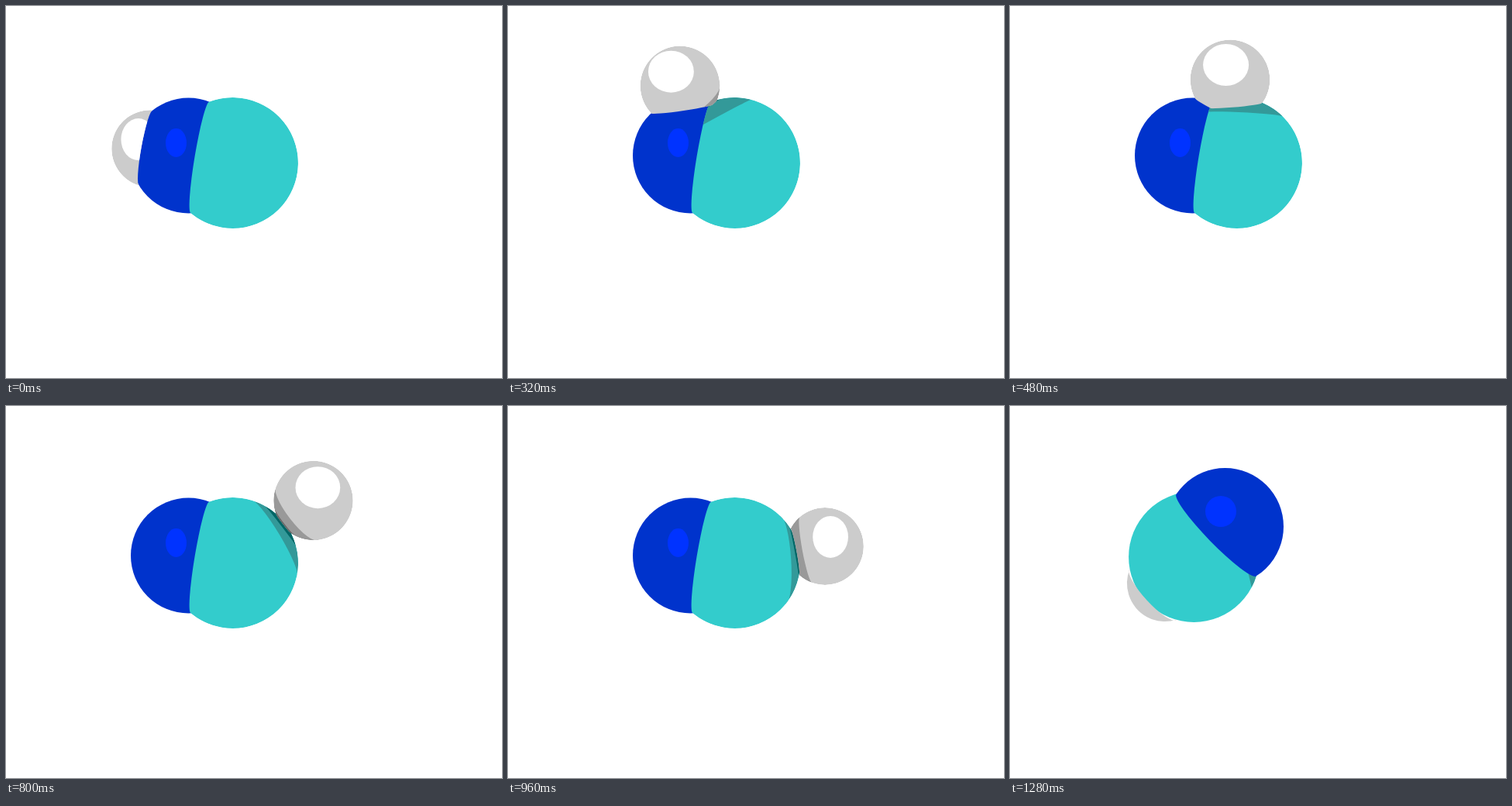
Animation of 640x480 px, one loop 1440 ms. Source, as an HTML page with a canvas:

```html
<!DOCTYPE html>
<html>
<head>
<meta charset="utf-8">
<title>Three-atom rearrangement</title>
<style>
html, body { margin: 0; width: 100%; height: 100%; overflow: hidden; background: #fff; }
canvas { display: block; }
</style>
</head>
<body>
<canvas id="stage" width="640" height="480"></canvas>
<script>
const ctx = document.getElementById('stage').getContext('2d');
const STEP = 160, SHADE_SPREAD = 0.75;
const BLUE = '#0033cc', GLINT = '#0033ff', TEAL = '#33cccc', SHADE = '#339999', DEEP = '#006666';
const PALE = '#cccccc', GREY = '#999999', DARK = '#666666', WHITE = '#ffffff';

const atom = (x, y, r) => ({ x, y, r });
const nitrogen = atom(235.5, 193, 74.5), carbon = atom(292.5, 202.5, 84.5);

// Stops of the hydrogen on its way around the pair
const orbit = [[186, 184], [187, 149.5], [222, 103], [284, 95], [348, 97.5], [396.5, 122], [409, 181], [402.5, 195.5]];

const heading = (a, b) => Math.atan2(b.y - a.y, b.x - a.x);
const distance = (a, b) => Math.hypot(b.x - a.x, b.y - a.y);

// Part of a disc around direction dir; its inner edge is half an ellipse, bulging along dir
function cap(a, dir, spread, bulge) {
  const path = new Path2D(), inner = a.r * Math.cos(spread);
  path.arc(a.x, a.y, a.r, dir - spread, dir + spread);
  path.ellipse(a.x + inner * Math.cos(dir), a.y + inner * Math.sin(dir), Math.abs(bulge), a.r * Math.sin(spread),
    dir, Math.PI / 2, bulge > 0 ? -Math.PI / 2 : Math.PI * 1.5, bulge > 0);
  path.closePath();
  return path;
}

// What is left of atom a where atom b cuts into it
function cut(a, b, bulge) {
  const d = distance(a, b);
  const reach = (a.r ** 2 - b.r ** 2 + d ** 2) / (2 * d);
  const half = Math.acos(Math.min(1, reach / a.r));
  return cap(a, heading(b, a), Math.PI - half, bulge);
}

function fill(color, path) {
  ctx.fillStyle = color;
  ctx.fill(path);
}

function oval(color, x, y, rx, ry) {
  const path = new Path2D();
  path.ellipse(x, y, rx, ry, 0, 0, 2 * Math.PI);
  fill(color, path);
}

const disc = (color, a) => oval(color, a.x, a.y, a.r, a.r);

function clipped(paths, paint) {
  ctx.save();
  paths.forEach(path => ctx.clip(path));
  paint();
  ctx.restore();
}

function drawOrbit(x, y) {
  const drop = (y - 95) / 100;
  const hydrogen = atom(x, y, 51.4 - 2 * drop ** 2);
  const out = heading(carbon, hydrogen), back = out + Math.PI;
  const seam = other => cut(hydrogen, other, (y - 140) * 7 / distance(hydrogen, other));

  disc(BLUE, nitrogen);
  oval(GLINT, 219.5, 176.5, 13.5, 18.5);
  clipped([cut(carbon, nitrogen, -7)], () => {
    disc(TEAL, carbon);
    fill(SHADE, cap(carbon, out + 0.12, SHADE_SPREAD, 12 + 5 * out));
    fill(DEEP, cap(carbon, out, 0.4, 1));
  });
  clipped([seam(nitrogen), seam(carbon)], () => {
    disc(PALE, hydrogen);
    fill(GREY, cap(hydrogen, back, 1.05, 16 - 13 * drop));
    fill(DARK, cap(hydrogen, back, 0.5, 3));
    oval(WHITE, x + (x - 338) / 10, y - 19 + 8 * drop, 29.5 - 9 * drop ** 2, 27);
  });
}

function drawTurned() {
  const n = atom(277.5, 155.5, 75.5), c = atom(237.3, 194.7, 84.2), h = atom(200, 229, 49);
  disc(TEAL, c);
  fill(PALE, cut(h, c, 11));
  fill(SHADE, cap(c, -0.26, SHADE_SPREAD, 1));
  fill(BLUE, cut(n, c, -11));
  oval(GLINT, 272, 136, 20, 20);
}

const start = performance.now();
function draw() {
  const step = Math.floor((performance.now() - start) / STEP) % (orbit.length + 1);
  ctx.fillStyle = WHITE;
  ctx.fillRect(0, 0, 640, 480);
  if (step < orbit.length) drawOrbit(...orbit[step]);
  else drawTurned();
  requestAnimationFrame(draw);
}
draw();
</script>
</body>
</html>
```
